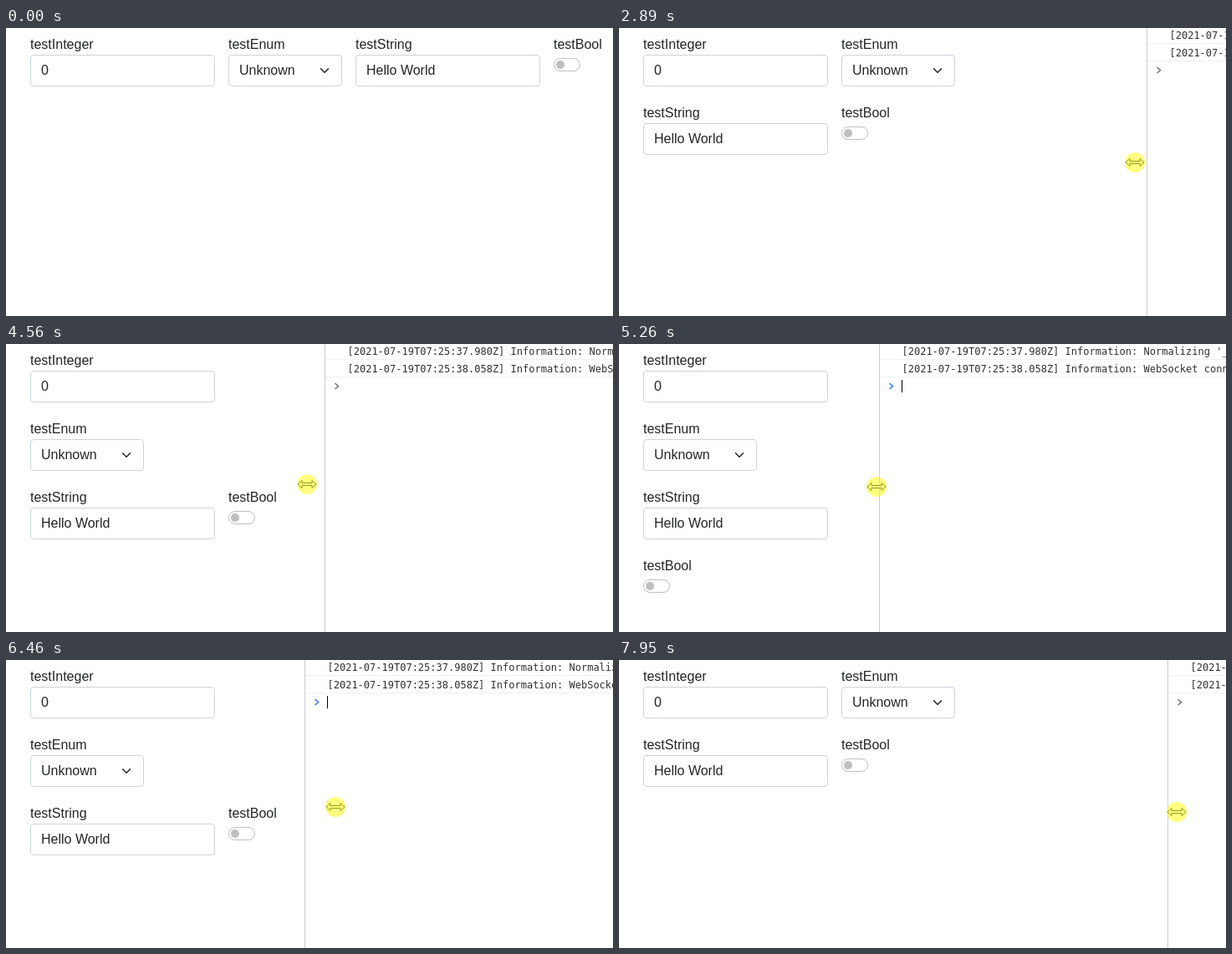
Animation, 726 px wide and 345 px high, one loop 8 s. Source, as an HTML page:

```html
<!DOCTYPE html>
<html>
<head>
<meta charset="utf-8">
<style>
  html, body { margin: 0; width: 100%; height: 100%; overflow: hidden; background: #fff; }
  * { box-sizing: border-box; }
  #form {
    position: absolute; left: 0; top: 8px; padding: 0 4px 0 29px;
    display: flex; flex-wrap: wrap; align-items: flex-start;
    font: 16px/24px "Liberation Sans", Arial, sans-serif; color: #212529;
  }
  .field { margin: 0 16px 20px 0; white-space: nowrap; }
  .box {
    position: relative; width: 221px; height: 38px; padding: 6px 12px;
    border: 1px solid #ced4da; border-radius: 4px;
  }
  .select { width: 136px; }
  .select svg { position: absolute; right: 14px; top: 12px; }
  .switch {
    width: 32px; height: 16px; margin-top: 4px;
    border: 1px solid #bfbfbf; border-radius: 8px;
  }
  .switch::before {
    content: ""; display: block; width: 10.5px; height: 10.5px; margin: 1.75px;
    border-radius: 50%; background: #bfbfbf;
  }
  #overlay { position: absolute; left: 0; top: 0; }
  #overlay text { font: 12px "DejaVu Sans Mono", "Liberation Mono", monospace; fill: #303030; white-space: pre; }
</style>
</head>
<body>
<div id="form">
  <div class="field">testInteger<div class="box">0</div></div>
  <div class="field">testEnum<div class="box select">Unknown
    <svg width="12" height="12" viewBox="0 0 16 16"><path d="M2 5l6 6 6-6" fill="none" stroke="#212529" stroke-width="2" stroke-linecap="round" stroke-linejoin="round"/></svg>
  </div></div>
  <div class="field">testString<div class="box">Hello World</div></div>
  <div class="field">testBool<div class="switch"></div></div>
</div>
<svg id="overlay" width="726" height="345">
  <g id="console">
    <rect width="726" height="345" fill="#fff"/>
    <path d="M1 18.5H726M1 39.5H726" stroke="#f0f0f0"/>
    <path d="M.5 0V345" stroke="#cacdd1"/>
    <text x="27.5" y="13">[2021-07-19T07:25:37.980Z] Information: Normalizing '_blazor'</text>
    <text x="27.5" y="34">[2021-07-19T07:25:38.058Z] Information: WebSocket connected to</text>
    <path id="prompt" d="M12.5 47l4 3.5-4 3.5" fill="none" stroke-width="1.6"/>
    <path id="caret" d="M27.5 43V58" stroke="#000"/>
  </g>
  <g id="resize">
    <path d="M-11 0l5-4.5v3H6v-3l5 4.5-5 4.5v-3H-6v3z" fill="#fff" stroke="#000" stroke-width=".8"/>
    <circle r="12" fill="#ff0" fill-opacity=".5"/>
  </g>
  <path id="pointer" d="M700.5 333.5v16l4-4 3 6 2-1-3-6h5z" fill="#fff" stroke="#000"/>
</svg>
<script>
const $ = id => document.getElementById(id);
const show = (id, visible) => $(id).style.display = visible ? "" : "none";

// Turning points of the drag: time, x
const drag = [[2070, 728], [3640, 542], [4700, 357], [5260, 311], [5690, 300],
  [6000, 300], [6460, 357], [6780, 456], [7590, 623], [8070, 667]];
const lag = 120; // the divider trails the mouse

function dragX(t) {
  const i = drag.findIndex(k => k[0] > t);
  if (i < 1) return i ? 667 : 760;
  const [t0, a] = drag[i - 1], [t1, b] = drag[i];
  return Math.round(a + (b - a) * (t - t0) / (t1 - t0));
}

function draw() {
  const t = performance.now() % 8000;
  const x = dragX(t), focused = x < 370;
  const mouseY = Math.round(164 + (t - 3530) * 0.0041);
  $("form").style.width = x + "px";
  $("console").setAttribute("transform", `translate(${x})`);
  $("resize").setAttribute("transform", `translate(${dragX(t + lag)} ${mouseY})`);
  $("prompt").setAttribute("stroke", focused ? "#367cf1" : "#727272");
  show("resize", x < 726);
  show("caret", focused);
  show("pointer", t >= 750 && t < 820);
  requestAnimationFrame(draw);
}
draw();
</script>
</body>
</html>
```
